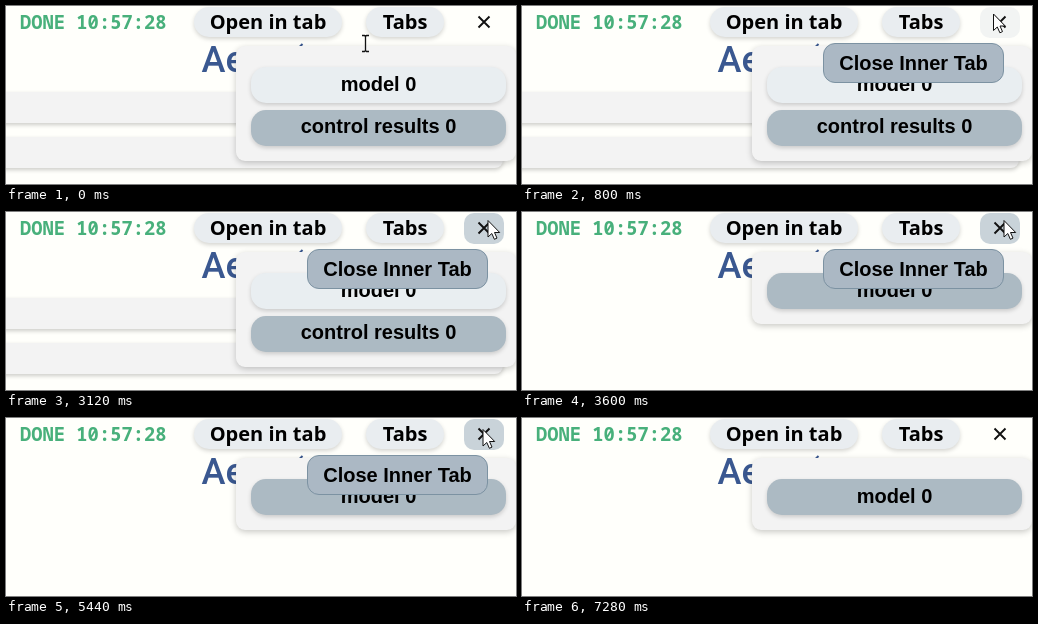
An HTML page that plays this animation: 510 px wide and 178 px high, repeating every 7.6 s.

```html
<!DOCTYPE html>
<html lang="en">
<head>
<meta charset="utf-8">
<title>Closing an inner tab</title>
<style>
  html, body { margin: 0; width: 100%; height: 100%; overflow: hidden; background: #fffffb; }
  #stage { position: relative; width: 510px; height: 178px; overflow: hidden; background: #fffffb; }
  #stage div, #stage svg { position: absolute; box-sizing: border-box; }
  #stage div { white-space: nowrap; }
  #time { left: 14px; top: 1px; color: #48b07b; font: 600 18.8px/30px "Noto Sans Mono", monospace; }
  #title { left: 195.5px; top: 32px; color: #3a5890; font: 500 36px/45px Roboto, sans-serif; }
  .bar { left: -10px; width: 507px; height: 31px; background: #f3f3f3; border-radius: 8px; box-shadow: 0 2px 4px rgba(0,0,0,.2); }
  .btn { top: 1px; height: 30px; border-radius: 15px; text-align: center; color: #000; background: #e9edf0;
    font: 700 20px/29px "Noto Sans", "Open Sans", sans-serif; box-shadow: 0 2px 4px rgba(0,0,0,.17); }
  #open { left: 188px; width: 148px; }
  #tabs { left: 360px; width: 78px; }
  #closeBg { left: 458px; top: 1px; width: 40px; height: 31px; border-radius: 10px; background: #c9d3d9; }
  #menu { left: 230px; top: 40px; width: 280px; background: #f3f3f3; border-radius: 9px; box-shadow: 0 2px 6px rgba(0,0,0,.22); }
  .row { left: 15px; width: 255px; height: 36px; border-radius: 15px; text-align: center; color: #000;
    font: 700 20px/34px "Liberation Sans", Arial, sans-serif; box-shadow: 0 2px 4px rgba(0,0,0,.17); }
  #model { top: 21px; }
  #results { top: 64px; background: #acbac3; line-height: 32px; }
  #tip { left: 301px; top: 37px; width: 181px; height: 40px; border: 1px solid #7c92a2; border-radius: 12px; background: #abb8c4;
    text-align: center; color: #000; font: 700 20px/38px "Liberation Sans", Arial, sans-serif; }
  svg { left: 0; top: 0; }
</style>
</head>
<body>
<div id="stage">
  <div id="time">DONE 10:57:28</div>
  <div id="title">Ae</div>
  <svg width="510" height="178"><path d="M293.5 41L296.5 38" stroke="#3a5890" stroke-width="2"/></svg>
  <div class="bar" style="top:86px"></div>
  <div class="bar" style="top:131px"></div>
  <div class="btn" id="open">Open in tab</div>
  <div class="btn" id="tabs">Tabs</div>
  <div id="closeBg"></div>
  <svg width="510" height="178"><path d="M472.5 10.5L483.5 21.5M483.5 10.5L472.5 21.5" stroke="#111" stroke-width="1.9"/></svg>
  <div id="menu">
    <div class="row" id="model">model 0</div>
    <div class="row" id="results">control results 0</div>
  </div>
  <div id="tip">Close Inner Tab</div>
  <svg width="510" height="178">
    <path id="beam" d="M356 29.5H358.5L359.5 30.5L360.5 29.5H363M359.5 30V45M356 45.5H358.5L359.5 44.5L360.5 45.5H363" fill="none" stroke="#111" stroke-width="1.3"/>
    <path id="arrow" d="M0 0V16.5L3.8 13L6.4 18.8L9 17.6L6.5 12H11.7Z" fill="#fff" stroke="#111" stroke-width="1" stroke-linejoin="round"/>
  </svg>
</div>
<script>
const LOOP = 7600, STEP = 80;
const $ = id => document.getElementById(id);
const bars = document.querySelectorAll(".bar");

// pointer waypoints: time, x, y
const path = [
  [80, 359, 37], [160, 369, 29], [320, 402, 18], [480, 436, 17], [560, 447, 17],
  [720, 466, 11], [800, 471.5, 8], [1040, 482, 8.5], [5280, 482, 8.5],
  [5440, 477, 11.5], [5520, 477, 11.5], [5760, 480, -22]
];

const clamp = v => Math.max(0, Math.min(1, v));
const ramp = (t, from, to) => clamp((t - from) / (to - from));
const mix = (a, b, k) => `rgb(${a.map((v, i) => Math.round(v + (b[i] - v) * k))})`;
const show = (el, on) => { el.style.visibility = on ? "visible" : "hidden"; };

function pointerAt(t) {
  let i = 1;
  while (i < path.length - 1 && t > path[i][0]) i++;
  const [t0, x0, y0] = path[i - 1], [t1, x1, y1] = path[i];
  const k = ramp(t, t0, t1);
  return [x0 + (x1 - x0) * k, y0 + (y1 - y0) * k];
}

function render(t) {
  const closed = t >= 3440;
  const tabsHover = ramp(t, 80, 400) - ramp(t, 560, 800);
  const closeHover = ramp(t, 720, 1040) - ramp(t, 5520, 5840);

  $("tabs").style.background = mix([233, 237, 240], [182, 195, 203], tabsHover);
  $("closeBg").style.opacity = closeHover;
  $("model").style.background = closed ? "#acbac3" : "#e9eef1";
  $("menu").style.height = closed ? "72px" : "115px";
  show($("results"), !closed);
  bars.forEach(bar => show(bar, !closed));
  show($("tip"), t >= 720 && t < 5600);

  const [x, y] = pointerAt(t);
  show($("beam"), t < 80);
  show($("arrow"), t >= 80 && t < 5760);
  $("arrow").setAttribute("transform", `translate(${x} ${y})`);
}

const start = performance.now();
function frame() {
  const t = (performance.now() - start) % LOOP;
  render(Math.floor(t / STEP) * STEP);
  requestAnimationFrame(frame);
}
render(0);
requestAnimationFrame(frame);
</script>
</body>
</html>
```
